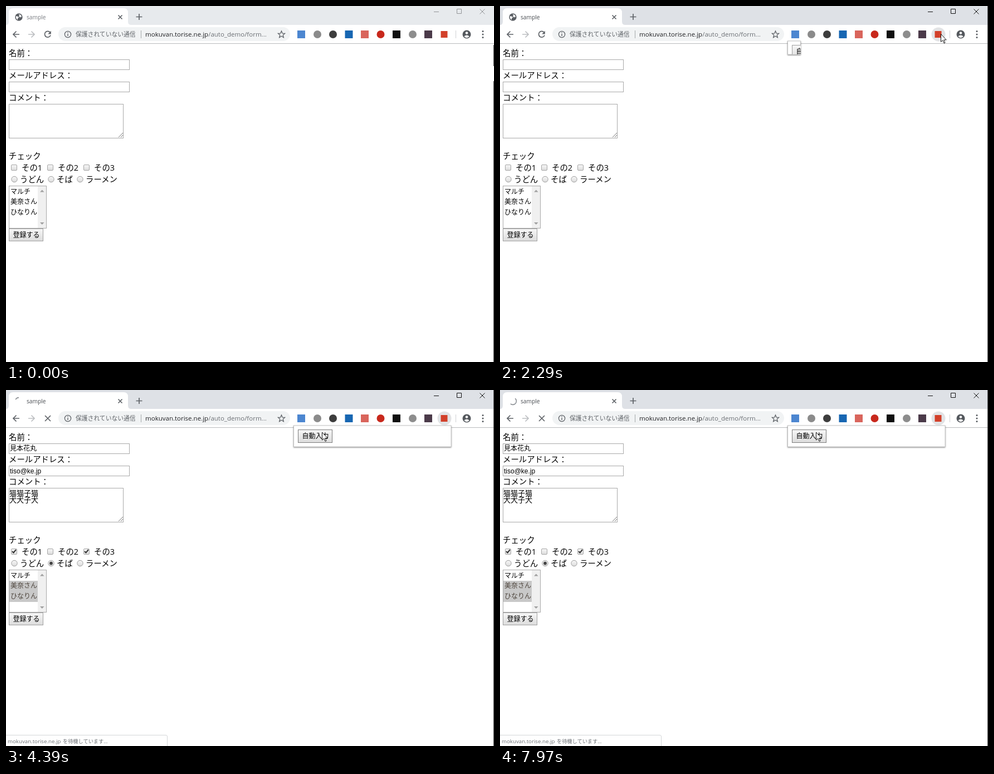
An HTML page that plays this animation: 876x640 px, repeating every 8000 ms.

```html
<!DOCTYPE html>
<html lang="ja">
<head>
<meta charset="utf-8">
<title>sample</title>
<style>
  html, body { margin: 0; width: 100%; height: 100%; overflow: hidden; background: #fff; }
  svg { display: block; }
  text { font-family: "Open Sans", "Noto Sans CJK JP", "Noto Sans CJK", sans-serif; white-space: pre; }
  .page text { font-size: 14.4px; fill: #000; }
  .page .small, .small { font-size: 12px; fill: #000; }
  .page .option { font-size: 12px; fill: inherit; }
  .page .arial { font: 12px "Liberation Sans", sans-serif; }
  .page .area { font-size: 13px; }
  .line { fill: none; stroke: #5f6368; stroke-width: 1.7; }
  .thin { stroke-width: 1.3; }
  .field { fill: #fff; stroke: #a9a9a9; }
  .button { fill: url(#face); stroke: #a0a0a0; }
</style>
</head>
<body>
<svg id="stage" width="876" height="640" viewBox="0 0 876 640">
  <defs>
    <linearGradient id="face" x2="0" y2="1"><stop stop-color="#f7f7f7"/><stop offset="1" stop-color="#dcdcdc"/></linearGradient>
    <linearGradient id="pressedFace" x2="0" y2="1"><stop stop-color="#d4d4d4"/><stop offset="1" stop-color="#f0f0f0"/></linearGradient>
    <filter id="shadow" x="-20%" y="-20%" width="140%" height="150%"><feDropShadow dx="0" dy="1" stdDeviation="1.3" flood-opacity=".55"/></filter>
  </defs>
  <rect width="876" height="640" fill="#fff"/>

  <!-- Tab strip -->
  <rect id="strip" width="876" height="34"/>
  <path d="M0 34Q5 34 5 28V12Q5 4 13 4H211Q219 4 219 12V28Q219 34 225 34Z" fill="#fff"/>
  <g id="globe">
    <circle cx="23" cy="20" r="6.7" fill="#5a5e63"/>
    <path d="M18 18l4 1 1 2-2 1v3l-3-3zM23 14.5l4 2 1 3-3 1-2-2 1-1z" fill="#fff"/>
  </g>
  <path id="spinner" fill="none" stroke="#8b8f94" stroke-width="1.6"/>
  <text id="tabTitle" x="37" y="24" font-size="10.2">sample</text>
  <path class="line" d="M201.5 16.5l7 7m0-7l-7 7M233.5 19.5h11M239 14v11"/>
  <path id="windowButtons" fill="none" d="M768 10.5h9M809.5 5.5h8v8h-8zM850.5 5.5l9 9m0-9l-9 9"/>

  <!-- Toolbar -->
  <path d="M0 67.5H876" stroke="#b9babc"/>
  <path class="line" d="M24 51H13m5.5-5.5L13 51l5.5 5.5"/>
  <path class="line" style="stroke:#bcbec1" d="M40 51h11m-5.5-5.5L51 51l-5.5 5.5"/>
  <g id="reload"><path class="line" d="M79 47.2A5.4 5.4 0 1 0 80 52.5"/><path d="M80.8 44.8v5.6h-5.6z" fill="#5f6368"/></g>
  <path id="stop" class="line" d="M70 46l10 10m0-10l-10 10"/>
  <rect x="94" y="38" width="416" height="25" rx="12.5" fill="#f1f3f4"/>
  <circle class="line thin" cx="111" cy="51" r="5.6"/>
  <path d="M111 50v4M111 47v1.6" stroke="#5f6368" stroke-width="1.4"/>
  <text x="125" y="55" font-size="10.8" fill="#5f6368">保護されていない通信</text>
  <path d="M242.5 44v14" stroke="#a5a8ab"/>
  <text x="250" y="55" font-size="11.5" fill="#202124">mokuvan.torise.ne.jp<tspan fill="#6b6f74">/auto_demo/form...</tspan></text>
  <path class="line thin" d="M494.5 45l1.7 4.1 4.4.3-3.4 2.8 1.1 4.3-3.8-2.3-3.8 2.3 1.1-4.3-3.4-2.8 4.4-.3z"/>
  <circle id="hover" cx="787" cy="51" r="12.5" fill="#e2e3e5"/>
  <g id="extensions"></g>
  <path d="M807.5 44v14" stroke="#d0d2d5"/>
  <circle cx="827" cy="51" r="7.5" fill="#54585d"/>
  <circle cx="827" cy="48.5" r="2.3" fill="#fff"/>
  <path d="M822.3 54.8Q827 50.3 831.7 54.8Q827 59.5 822.3 54.8" fill="#fff"/>
  <path d="M856 45.5h.01M856 51h.01M856 56.5h.01" stroke="#54585d" stroke-width="3" stroke-linecap="round"/>
  <path id="windowEdge" stroke="#3c3c3c"/>

  <!-- Form -->
  <g class="page">
    <text x="5" y="90">名前：</text>
    <rect class="field" x="5.5" y="96.5" width="216" height="18"/>
    <text x="5" y="130">メールアドレス：</text>
    <rect class="field" x="5.5" y="136.5" width="216" height="18"/>
    <text x="5" y="170">コメント：</text>
    <rect class="field" x="5.5" y="176.5" width="205" height="61"/>
    <path d="M202 236l8-8M206 236l4-4" stroke="#777"/>
    <text x="5" y="274.5">チェック</text>
    <g id="choices"></g>
    <rect class="field" x="5.5" y="323.5" width="67" height="76"/>
    <rect x="57" y="324" width="15" height="75" fill="#f0f0f0"/>
    <path d="M61 334.5l3.8-4 3.8 4zM61 389l3.8 4 3.8-4z" fill="#a0a0a0"/>
    <rect id="selection" x="6" y="343" width="51" height="38" fill="#c8c8c8"/>
    <text class="small" x="8" y="337.5">マルチ</text>
    <g id="options">
      <text class="option" x="8" y="356">美奈さん</text>
      <text class="option" x="8" y="374.5">ひなりん</text>
    </g>
    <rect class="button" x="5.5" y="400.5" width="61" height="22"/>
    <text class="small" x="12.5" y="416">登録する</text>
    <g id="filled">
      <text class="small" x="7" y="109">見本花丸</text>
      <text class="arial" x="7" y="150">tiso@ke.jp</text>
      <text class="area" x="6" y="190">猫猫子猫</text>
      <text class="area" x="6" y="201.5">犬犬子犬</text>
      <path d="M11 290l2.5 2.5 4.5-5.5M141 290l2.5 2.5 4.5-5.5" fill="none" stroke="#333" stroke-width="2"/>
      <circle cx="81" cy="311.5" r="2.9" fill="#444"/>
    </g>
  </g>

  <!-- Status bubble -->
  <g id="status">
    <path d="M-1 641V620.5H287Q289.5 620.5 289.5 623V641Z" fill="#fff" stroke="#d4d6d8"/>
    <text x="3" y="635" font-size="9.7" fill="#6b6f74">mokuvan.torise.ne.jp</text>
    <text x="102" y="635" font-size="9.2" fill="#6b6f74">を待機しています...</text>
  </g>

  <!-- Extension popup -->
  <g id="popup">
    <rect id="popupFrame" x="516.5" fill="#fff" stroke="#b8b8b8" stroke-width=".8" filter="url(#shadow)"/>
    <svg id="popupContent" x="517">
      <rect id="fillButton" class="button" x="7.5" y="7.5" width="61" height="23"/>
      <text class="small" x="14.5" y="23">自動入力</text>
    </svg>
  </g>
  <path id="cursor" d="M.5.5V14.5L3.7 11.6 6 16.8 8 16 5.8 10.9H10.2Z" fill="#fff" stroke="#000" stroke-width=".9"/>
</svg>
<script>
const LOOP = 8000, ACTIVATE = 1760, POPUP = 2220, PRESS = 4010, SUBMIT = 4155;
const FRAME = 77.76, REVOLUTION = 1320;
const $ = id => document.getElementById(id);
const set = (id, attrs) => { for (const key in attrs) $(id).setAttribute(key, attrs[key]); };
const show = (id, on) => set(id, { visibility: on ? 'visible' : 'hidden' });

// Pointer positions: [time, x, y]
const pointer = [
  [120, 791, 622], [200, 774, 535], [280, 748, 430], [355, 725, 322], [435, 714, 222],
  [515, 722, 138], [590, 738, 80], [670, 750, 44], [750, 757, 27],
  [900, 758, 35], [975, 766, 41], [1050, 773, 45], [1360, 781, 48], [1590, 791, 50],
  [3000, 765, 55], [3075, 690, 67], [3150, 610, 74], [3225, 593, 74], [3300, 582, 73], [3460, 567, 75.5]
];

const square = (x, color, size = 14) =>
  `<rect x="${x - size / 2}" y="${51 - size / 2}" width="${size}" height="${size}" fill="${color}"/>`;
const disc = (x, color) => `<circle cx="${x}" cy="51" r="7" fill="${color}"/>`;
$('extensions').innerHTML =
  square(530, '#4c86d0') + disc(559, '#8b8b8b') + disc(587, '#3d3d3d') + square(615.5, '#1766b2') +
  square(644, '#d9655c') + disc(672.5, '#c8281c') + square(701, '#101010') + disc(730, '#8d8d8d') +
  square(758, '#4b3a49') + square(786.5, '#d2402a', 12);

$('choices').innerHTML = [14, 79, 144].map((x, i) =>
  `<rect x="${x - 4.5}" y="285.5" width="10" height="10" rx="1.5" fill="url(#face)" stroke="#a6a6a6"/>
   <text x="${x + 14}" y="296">その${i + 1}</text>`).join('') +
  [[15, 'うどん'], [81, 'そば'], [133, 'ラーメン']].map(([x, label]) =>
  `<circle cx="${x}" cy="311.5" r="5.2" fill="url(#face)" stroke="#a0a0a0"/>
   <text x="${x + 10}" y="317">${label}</text>`).join('');

function drawSpinner(t) {
  // The leading end turns counter-clockwise; the tail follows half a turn behind.
  const elapsed = Math.floor((t - SUBMIT) / FRAME) * FRAME;
  const head = 90 + 360 * elapsed / REVOLUTION;
  const tail = Math.max(head - 180, 90);
  const point = angle => {
    const a = angle * Math.PI / 180;
    return `${23 + 6.4 * Math.cos(a)} ${20 - 6.4 * Math.sin(a)}`;
  };
  set('spinner', { d: `M${point(tail)}A6.4 6.4 0 0 0 ${point(head)}` });
}

function drawPopup(t) {
  const small = t < 2365;
  const box = small ? { y: 63, width: 23, height: 24 } : { y: 64, width: 282.5, height: 38 };
  set('popup', { display: t >= POPUP ? 'inline' : 'none' });
  set('popupFrame', box);
  set('popupContent', box);
  show('popupContent', t >= 2285);
  $('fillButton').style.stroke = t >= 3300 ? '#7d7d7d' : '';
  $('fillButton').style.fill = t >= PRESS && t < SUBMIT ? 'url(#pressedFace)' : '';
}

function draw(t) {
  const active = t >= ACTIVATE, loading = t >= SUBMIT;

  set('strip', { fill: active ? '#dee1e6' : '#e7eaed' });
  set('tabTitle', { fill: active ? '#484c51' : '#787b80' });
  set('windowButtons', { stroke: active ? '#111' : '#929497' });
  set('windowEdge', { d: active ? 'M875.5 0V640' : 'M875.5 70V108M875.5 135V640' });
  set('hover', { opacity: Math.max(0, Math.min(3, Math.floor((t - ACTIVATE) / 75) + 1)) / 3 });

  for (const id of ['filled', 'selection', 'stop', 'spinner']) show(id, loading);
  for (const id of ['globe', 'reload']) show(id, !loading);
  show('status', t >= 4235);
  set('options', { fill: loading ? '#4d443c' : '#000' });
  if (loading) drawSpinner(t);
  drawPopup(t);

  const position = pointer.findLast(([time]) => t >= time);
  show('cursor', position);
  if (position) set('cursor', { transform: `translate(${position[1]} ${position[2]})` });
}

const start = performance.now();
function tick(now) {
  draw(Math.max(0, now - start) % LOOP);
  requestAnimationFrame(tick);
}
draw(0);
requestAnimationFrame(tick);
</script>
</body>
</html>
```
